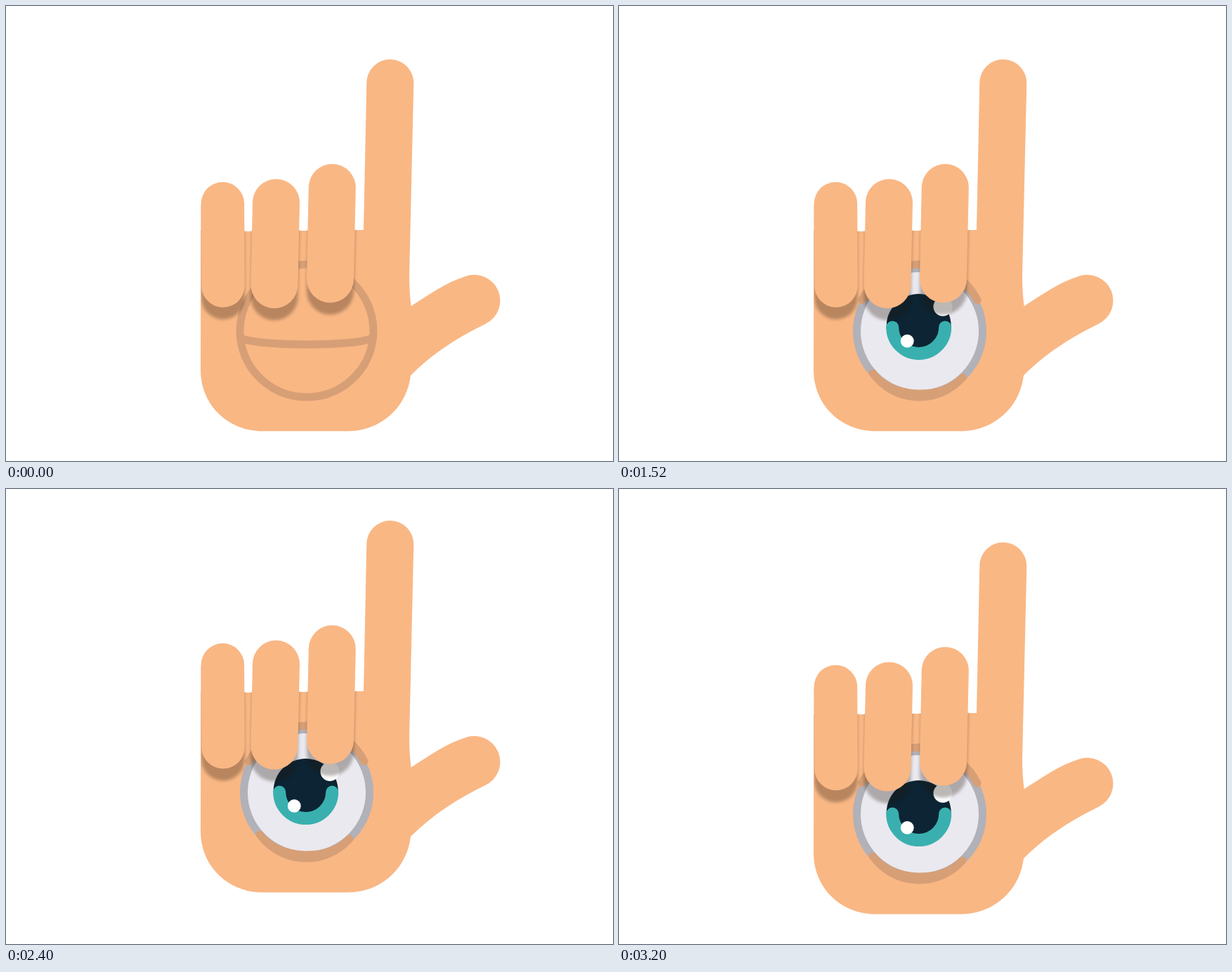
Animation, 864 px wide and 648 px high, one loop 3280 ms. Source, as an HTML page:

```html
<!DOCTYPE html>
<html>
<head>
<meta charset="utf-8">
<title>Hand with an eye</title>
<style>
  html, body { margin: 0; width: 100%; height: 100%; overflow: hidden; background: #fff; }
  svg { display: block; width: 100vw; height: 100vh; }
  .finger { stroke-linecap: round; }
  .lid { fill: #f9b784; stroke: #d79f76; stroke-width: 11; stroke-linejoin: round; }
</style>
</head>
<body>
<svg viewBox="0 0 864 648">
  <defs>
    <path id="palm" d="M277.5 283L277 518C277 570 318 605.5 365 605.5H487C530 605.5 570 575 576 526
      C608 494 645 471 682 453A36.8 36.8 0 0 0 654 385C626 394 602 411 576.5 427.5Q574 405 574 385
      L580.3 110A33.5 33.5 0 0 0 513.3 109L509 319L338 321V300Z"/>
    <g id="fingers" class="finger">
      <path d="M308.4 281.5L309 398.5" stroke-width="61.5"/>
      <path d="M384.5 280L382 397" stroke-width="67"/>
      <path d="M464.3 258.5L461.5 389" stroke-width="67"/>
    </g>
    <clipPath id="inside">
      <path d="M277 320L509 318.5H600V620H277Z"/>
    </clipPath>
    <filter id="soft" filterUnits="userSpaceOnUse" x="250" y="200" width="280" height="280">
      <feGaussianBlur stdDeviation="2"/>
    </filter>
  </defs>
  <g id="hand">
    <use href="#palm" fill="#f9b784"/>
    <circle cx="428" cy="463" r="89.5" fill="#eae9ef" stroke="#b1b1b9" stroke-width="11"/>
    <g id="iris">
      <path d="M380.7 461a46 46 0 0 1 92 0a46 44 0 0 1 -92 0" fill="#0c2433"/>
      <path d="M389.2 462.5a37.5 37.5 0 0 0 75 0" fill="none" stroke="#39b0af"
        stroke-width="18" stroke-linecap="round"/>
      <circle cx="410.3" cy="482.3" r="9.4" fill="#fff"/>
      <circle cx="461" cy="433.3" r="13.5" fill="#fff"/>
    </g>
    <path id="lower" class="lid"/>
    <path id="upper" class="lid"/>
    <g clip-path="url(#inside)">
      <g opacity=".3" filter="url(#soft)">
        <use href="#fingers" y="17" stroke="#24180f"/>
      </g>
    </g>
    <use href="#fingers" stroke="#f9b784"/>
  </g>
</svg>
<script>
const LOOP = 3280, STEP = 80, CX = 428;
const el = id => document.getElementById(id);
const mix = (a, b, k) => a + (b - a) * k;
const ease = k => (1 - Math.cos(Math.PI * k)) / 2;

// Eased value through [time, value] pairs
function track(keys, t) {
  if (t <= keys[0][0]) return keys[0][1];
  for (let i = 1; i < keys.length; i++) {
    const [t0, a] = keys[i - 1], [t1, b] = keys[i];
    if (t < t1) return mix(a, b, ease((t - t0) / (t1 - t0)));
  }
  return keys[keys.length - 1][1];
}

const openness = [[0, 0], [400, 1]];
const gaze = [[1280, -27], [1616, 0]];
const lift = [[1520, 0], [1680, 16], [2080, -71], [2360, -29.2], [2668, -71], [2880, 6], [2960, 0]];

// Lid between two corners: a round rim with its middle at height rim,
// and a free edge with its middle at height edge
function lid(half, y, rim, edge, bend) {
  const s = Math.abs(rim - y), r = (half * half + s * s) / (2 * s);
  const x = half * bend, c = y + (edge - y) * 4 / 3;
  return `M${CX - half} ${y}A${r} ${r} 0 ${s > half ? 1 : 0} ${rim < y ? 1 : 0} ${CX + half} ${y}` +
    `C${CX + x} ${c} ${CX - x} ${c} ${CX - half} ${y}Z`;
}

function draw(t) {
  const k = track(openness, t), bend = mix(0.8, 0.55, k);
  el('hand').setAttribute('transform', `translate(0 ${track(lift, t)})`);
  el('iris').setAttribute('transform', `translate(0 ${track(gaze, t)})`);
  el('upper').setAttribute('d', lid(mix(94.5, 82, k), mix(472, 419, k), 368, mix(482, 368, k), bend));
  el('lower').setAttribute('d', lid(mix(94.5, 64, k), mix(472, 526, k), 557, mix(482, 552, k), bend));
  el('lower').setAttribute('transform', `rotate(${2.7 * k} 428 463)`);
}

const start = performance.now();
function tick() {
  const t = (performance.now() - start) % LOOP;
  draw(Math.floor(t / STEP) * STEP);
  requestAnimationFrame(tick);
}
tick();
</script>
</body>
</html>
```
